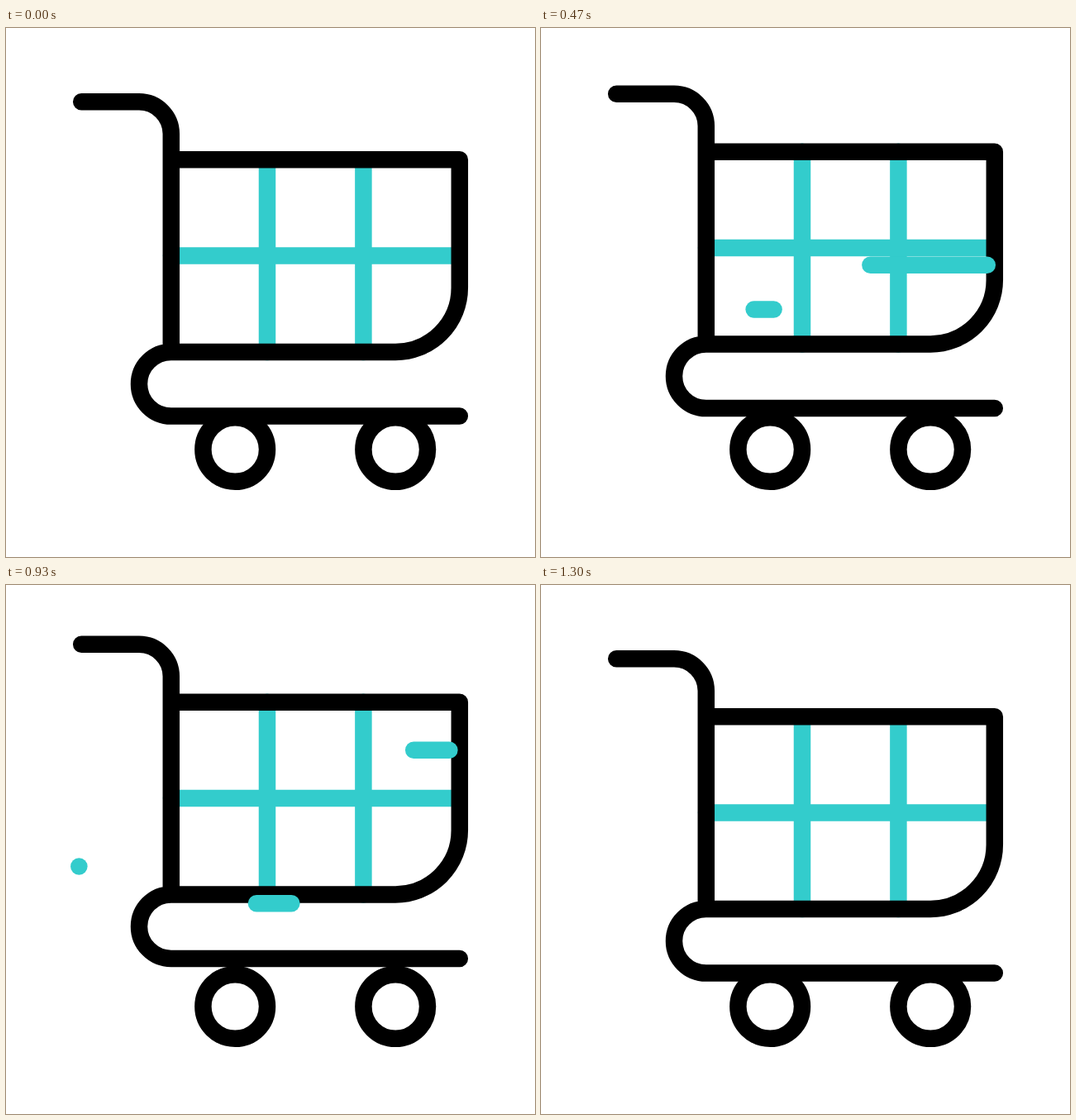
Animation, 640 px wide and 640 px high, one loop 2 s. Source, as an HTML page:

```html
<!DOCTYPE html>
<html lang="en">
<head>
<meta charset="utf-8">
<title>Shopping cart</title>
<style>
  html, body { margin: 0; width: 100%; height: 100%; overflow: hidden; background: #fff; }
  svg { display: block; width: 100%; height: 100%; }
  g, path { fill: none; stroke-width: 20.5; stroke-linecap: round; stroke-linejoin: round; }
  .ink { stroke: #000; }
  .teal { stroke: #3cc; }
</style>
</head>
<body>
<svg viewBox="0 0 640 640">
  <g class="ink">
    <circle cx="277.2" cy="510" r="38.8"/>
    <circle cx="471.2" cy="510" r="38.8"/>
  </g>
  <g id="cart">
    <path class="teal" d="M316 159.3V392M432.4 159.3V392M200 275.6H548.8"/>
    <path class="ink" d="M91.2 89.3H161a38.8 38.8 0 0 1 38.8 38.8V392M199.8 159.3H548.8V314.3a77.6 77.6 0 0 1 -77.6 77.6H199.8a38.8 38.8 0 0 0 0 77.6H548.8"/>
  </g>
  <g id="streaks" class="teal"></g>
</svg>
<script>
const LOOP = 2000, STEP = 100 / 3, LAST = 39;
const HEAD = 10, TAIL = 9.2; // travel time of each streak end, in steps

// [step, vertical offset]
const bounce = [
  [0, 0], [3, -13], [5.5, -21.5], [8, -13.5], [11.5, -6.2], [14, -9.5],
  [17.3, -20.5], [19, -17.3], [23.8, -6.2], [25, -7.5], [29.6, -20.6],
  [31, -18.7], [32, -14.9], [37, 0], [39, 0]
];

const streaks = [
  { y: 286.7, from: 539.8, to: 311.3, head: 8.2, tail: 15.4 },
  { y: 340.4, from: 281.6, to: 88.3, head: 11.8, tail: 18.9 },
  { y: 385.2, from: 380.2, to: 303, head: 16.6, tail: 23.7 },
  { y: 199.7, from: 536.4, to: 459.2, head: 22.6, tail: 29.7 }
];

const cart = document.getElementById("cart");
const layer = document.getElementById("streaks");
for (const s of streaks) {
  s.el = document.createElementNS("http://www.w3.org/2000/svg", "path");
  layer.appendChild(s.el);
}

function ease(x) {
  x = Math.max(0, Math.min(1, x));
  return x * x * (3 - 2 * x);
}

function slope(i) {
  const rate = k => (bounce[k + 1][1] - bounce[k][1]) / (bounce[k + 1][0] - bounce[k][0]);
  if (i === 0 || i === bounce.length - 1) return 0;
  const a = rate(i - 1), b = rate(i);
  return a * b > 0 ? 2 * a * b / (a + b) : 0;
}

// Monotone cubic through the bounce points
function lift(n) {
  let i = 0;
  while (i < bounce.length - 2 && n > bounce[i + 1][0]) i++;
  const [x0, y0] = bounce[i], [x1, y1] = bounce[i + 1];
  const w = x1 - x0, u = (n - x0) / w, v = 1 - u;
  return y0 * (1 + 2 * u) * v * v + w * slope(i) * u * v * v
    + y1 * u * u * (3 - 2 * u) - w * slope(i + 1) * u * u * v;
}

function stepAt(t) {
  const n = Math.min(LAST, Math.floor((t + 3.4) / STEP));
  return n < 16 && n % 6 === 3 ? n - 1 : n; // short holds early on
}

function draw(t) {
  const n = stepAt(t);
  cart.setAttribute("transform", `translate(0 ${lift(n).toFixed(2)})`);
  for (const s of streaks) {
    const head = ease((n - s.head) / HEAD), tail = ease((n - s.tail) / TAIL);
    const at = p => (s.from + (s.to - s.from) * p).toFixed(2);
    s.el.setAttribute("d", head > tail ? `M${at(tail)} ${s.y}H${at(head)}` : "");
  }
}

function tick(now) {
  draw(now % LOOP);
  requestAnimationFrame(tick);
}
draw(0);
requestAnimationFrame(tick);
</script>
</body>
</html>
```
